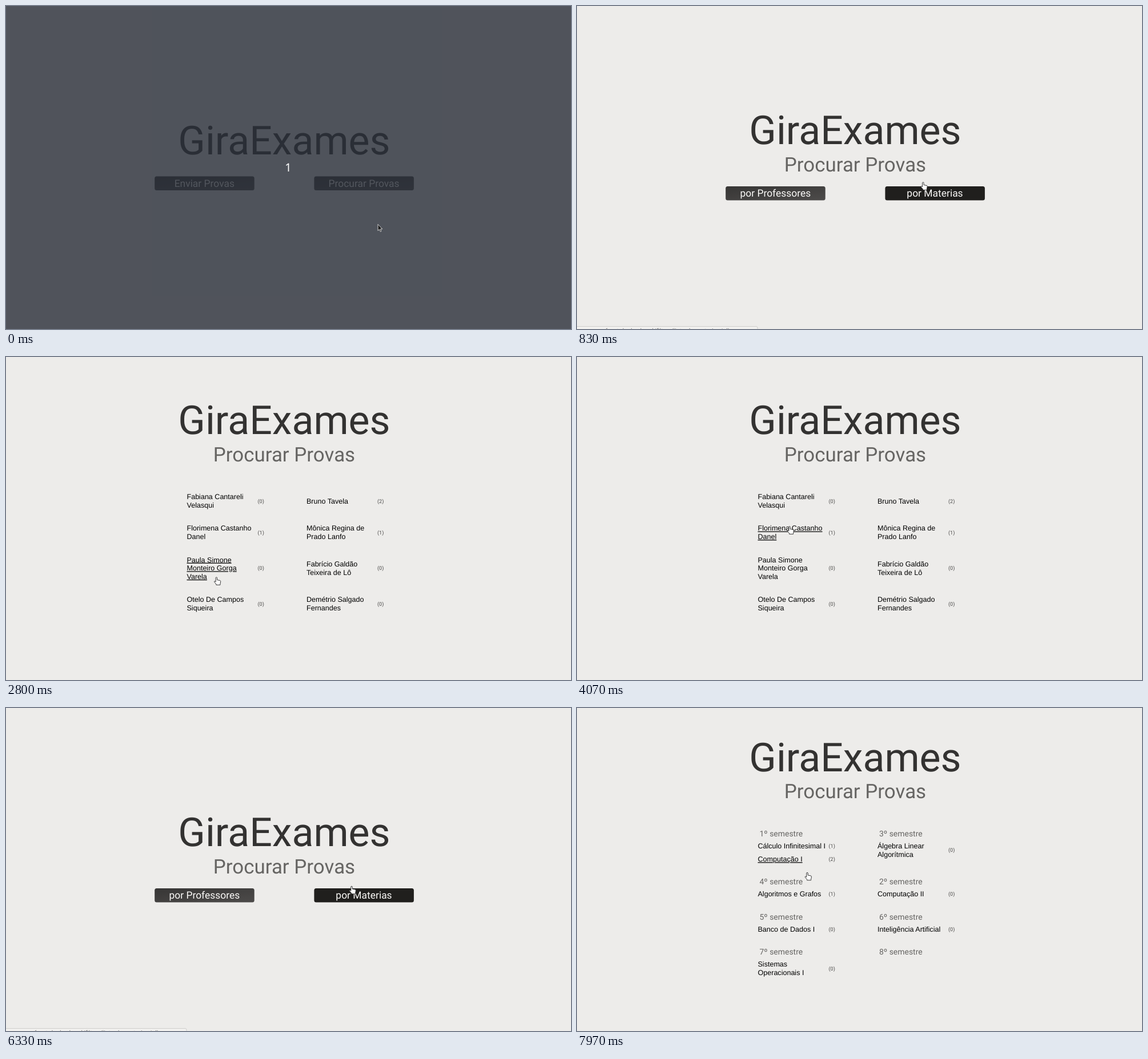
These frames come from a looping animation (989x566 px, 8 s). An HTML page:

```html
<!DOCTYPE html>
<html lang="pt-BR">
<head>
<meta charset="utf-8">
<title>GiraExames</title>
<style>
  html, body { margin: 0; width: 100%; height: 100%; overflow: hidden; background: #edecea; }
  svg { display: block; width: 989px; height: 566px; font-family: Roboto, sans-serif; text-rendering: geometricPrecision; }
  text { white-space: pre; }
  .scene { display: none; }
  .scene.on { display: inline; }
  .mid { text-anchor: middle; }
  .title { font-size: 69.8px; fill: #333231; }
  .sub { font-size: 34.9px; fill: #666563; }
  .part { font-size: 17.45px; fill: #666563; }
  .button rect { fill: url(#shade); }
  .button.on rect { fill: #201f1d; }
  .button text { font-size: 17.45px; fill: #faf9f7; }
  .item { font: 12.56px "Liberation Sans", Arial, sans-serif; fill: #000; }
  .item.on { text-decoration: underline; }
  .count { font-size: 9.07px; fill: #4c4b4a; }
  .term { font-size: 13.96px; fill: #666563; }
  .exam { font-size: 12.56px; fill: #444342; }
  .exam.name { fill: #000; }
  .status text { font-size: 11px; fill: #777; }
  .countdown { font: 20px "Noto Sans", sans-serif; fill: #fff; }
  #arrow { filter: drop-shadow(0 .6px .6px rgba(0, 0, 0, .35)); }
</style>
</head>
<body>
<svg viewBox="0 0 989 566">
  <defs>
    <linearGradient id="shade" x2="1" y2="1">
      <stop stop-color="#373635"/><stop offset="1" stop-color="#4d4b4a"/>
    </linearGradient>
  </defs>
  <g id="scenes"></g>
  <g id="status" class="status">
    <path d="M-1 567V561.5H314Q316 561.5 316 564V567" fill="#f2f1ef" stroke="#cfcecc"/>
    <text x="8" y="573.3"></text>
  </g>
  <g id="veil">
    <rect width="989" height="566" fill="rgb(41,45,55)" fill-opacity=".8"/>
    <text class="mid countdown" x="494" y="290">1</text>
  </g>
  <g id="cursor">
    <path id="arrow" d="M0 0V11.2L2.6 8.9 4.3 12.9 6 12.1 4.4 8.3H7.8Z" fill="#1a1a1a" stroke="#fff" stroke-width=".8"/>
    <path id="hand" d="M-1.2 1Q0-.6 1.2 1V5L6.2 6Q7.6 6.4 7.4 8L6.6 12.2V13.8H-.4V12.4L-3.6 8.7Q-4.2 7-2.6 7.2L-1.2 8.4Z"
      fill="#fff" stroke="#222" stroke-width=".9" stroke-linejoin="round"/>
  </g>
</svg>
<script>
const LOOP = 8000;
const $ = id => document.getElementById(id);

const label = (cls, x, y, text) => `<text class="${cls}" x="${x}" y="${y}">${text}</text>`;

const header = (y, withSub = true) =>
  label("mid title", 487, y, "GiraExames") +
  (withSub ? label("mid sub", 487, y + 47.5, "Procurar Provas") : "");

const button = (link, x, y, text) =>
  `<g class="button" data-link="${link}"><rect x="${x}" y="${y}" width="174.5" height="24.4" rx="3.5"/>` +
  label("mid", x + 87.1, y + 17.9, text) + "</g>";

const buttons = (y, left, right) => button("left", 260.2, y, left) + button("right", 539.4, y, right);

// A link of one or more lines, centred on y, with its number of exams.
function item(link, column, y, text, count) {
  const x = column ? 526 : 316.5;
  const lines = text.split("|");
  const top = y + 4.4 - (lines.length - 1) * 7.33;
  const spans = lines.map((line, i) => `<tspan x="${x}" y="${top + i * 14.66}">${line}</tspan>`).join("");
  return `<text class="item" data-link="${link}">${spans}</text>` +
    label("count", x + 124, y + 3.3, `(${count})`);
}

const term = (n, column, y) => label("term", column ? 529 : 319.5, y, `${n}º semestre`);

const teachers = [
  ["Fabiana Cantareli|Velasqui", 0], ["Bruno Tavela", 2],
  ["Florimena Castanho|Danel", 1], ["Mônica Regina de|Prado Lanfo", 1],
  ["Paula Simone|Monteiro Gorga|Varela", 0], ["Fabrício Galdão|Teixeira de Lô", 0],
  ["Otelo De Campos|Siqueira", 0], ["Demétrio Salgado|Fernandes", 0]
];
const teacherRows = [252.2, 307.4, 369.9, 432.4];

const scenes = {
  home: header(259.7, false) + buttons(298.6, "Enviar Provas", "Procurar Provas"),
  search: header(242.1) + buttons(316.1, "por Professores", "por Materias"),
  teachers: header(135.3) +
    teachers.map(([name, count], i) => item("t" + i, i % 2, teacherRows[i >> 1], name, count)).join(""),
  exams: header(215) +
    label("mid part", 487, 331.1, "P1") +
    label("exam name", 364.3, 354.9, "teste") +
    label("exam", 503.7, 354.9, "- Cálculo Infinitesimal I"),
  subjects: header(110.9) +
    term(1, 0, 224.8) + item("s0", 0, 241.6, "Cálculo Infinitesimal I", 1) +
    item("s1", 0, 264.8, "Computação I", 2) +
    term(3, 1, 224.8) + item("s2", 1, 249, "Álgebra Linear|Algorítmica", 0) +
    term(4, 0, 309.4) + item("s3", 0, 326, "Algoritmos e Grafos", 1) +
    term(2, 1, 309.4) + item("s4", 1, 326, "Computação II", 0) +
    term(5, 0, 370.8) + item("s5", 0, 387.4, "Banco de Dados I", 0) +
    term(6, 1, 370.8) + item("s6", 1, 387.4, "Inteligência Artificial", 0) +
    term(7, 0, 432.2) + item("s7", 0, 456.2, "Sistemas|Operacionais I", 0) +
    term(8, 1, 432.2)
};
$("scenes").innerHTML = Object.entries(scenes)
  .map(([name, body]) => `<g class="scene" data-scene="${name}">${body}</g>`).join("");

// Start time, scene, hovered link.
const states = [
  [0, "home"], [430, "home", "right"], [700, "search"], [830, "search", "right"],
  [1130, "search"], [1480, "search", "left"],
  [2330, "teachers", "t2"], [2580, "teachers"], [2680, "teachers", "t4"], [2830, "teachers"],
  [3450, "teachers", "t4"], [3530, "teachers"], [3600, "teachers", "t2"],
  [4270, "exams"], [4900, "exams", "title"], [5230, "home"],
  [5570, "home", "title"], [5820, "home"], [5960, "home", "right"],
  [6165, "search"], [6325, "search", "right"],
  [7100, "subjects", "s4"], [7400, "subjects"], [7900, "subjects", "s1"]
];

// Time and pointer position.
const path = [
  [0, 651, 382.5], [130, 651, 382.5], [560, 608, 310], [970, 605, 308],
  [1770, 318, 321.5], [2450, 318, 321.5], [2950, 382, 403], [3370, 382, 403],
  [3630, 382, 317], [3720, 382, 317], [3830, 372, 296.5], [4500, 372, 296.5],
  [4730, 444, 278], [4800, 444, 278], [5040, 470, 186], [5530, 470, 186],
  [6030, 605, 312], [6330, 605, 312], [6830, 602, 323], [7200, 602, 323],
  [7770, 462, 342], [7970, 403, 288], [LOOP, 403, 288]
];

const statusText = {
  title: "exames-front-deploy.local/",
  home: "exames-front-deploy.local/filtrar",
  left: "exames-front-deploy.local/filtrar/lista-de-professores/all",
  right: "exames-front-deploy.local/filtrar/lista-de-materias/all"
};

function pointerAt(t) {
  const i = path.findIndex(p => p[0] > t);
  const [t0, x0, y0] = path[i - 1], [t1, x1, y1] = path[i];
  const k = (t - t0) / (t1 - t0), e = k * k * (3 - 2 * k);
  return [x0 + (x1 - x0) * e, y0 + (y1 - y0) * e];
}

const sceneNodes = document.querySelectorAll(".scene");
const linkNodes = document.querySelectorAll("[data-link]");
const show = (id, visible) => { $(id).style.display = visible ? "inline" : "none"; };
let current;

function applyState(state) {
  if (state === current) return;
  current = state;
  const [, scene, hover] = state;
  sceneNodes.forEach(n => n.classList.toggle("on", n.dataset.scene === scene));
  linkNodes.forEach(n => n.classList.toggle("on", n.dataset.link === hover));
  const url = statusText[scene === "home" && hover === "right" ? "home" : hover];
  show("status", url);
  $("status").lastElementChild.textContent = url || "";
  show("hand", hover);
  show("arrow", !hover);
}

function draw(now) {
  const t = now % LOOP;
  applyState(states.findLast(s => s[0] <= t));
  show("veil", t < 68);
  $("cursor").setAttribute("transform", `translate(${pointerAt(t)})`);
}

const start = performance.now();
function tick() {
  draw(performance.now() - start);
  requestAnimationFrame(tick);
}
tick();
</script>
</body>
</html>
```
